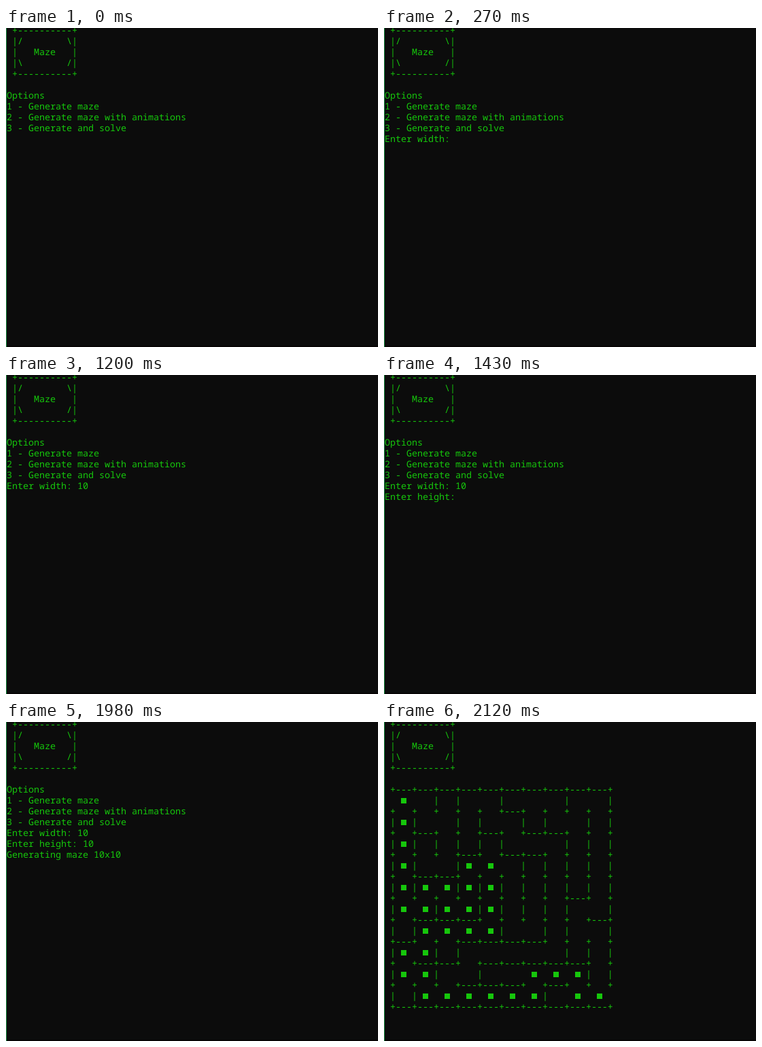
Write an HTML page that moves like this. It is 547x470 px and loops after 2.75 s.

```html
<!DOCTYPE html>
<html lang="en">
<head>
<meta charset="utf-8">
<title>Maze console</title>
<style>
html, body { margin: 0; width: 100%; height: 100%; overflow: hidden; background: #0c0c0c; }
svg { display: block; width: 547px; height: 470px; }
text {
  font: 13.333px "Noto Sans Mono", "DejaVu Sans Mono", monospace;
  white-space: pre;
  text-rendering: geometricPrecision;
}
g, rect.step, text { fill: #16c60c; }
#title, #menu, #maze, .step { animation: 2750ms step-end infinite; }
#title { animation-name: title; }
#menu { animation-name: menu; }
#maze { animation-name: maze; }
@keyframes title { 0% { opacity: 1 } 74.181% { opacity: 0 } 77.09% { opacity: 1 } }
@keyframes menu { 0% { opacity: 1 } 74.181% { opacity: 0 } }
@keyframes maze { 0% { opacity: 0 } 77.09% { opacity: 1 } }
/* each typed piece: hidden until its moment */
@keyframes choice { 0% { opacity: 0 } 6.909% { opacity: 1 } 9.818% { opacity: 0 } }
@keyframes width { 0% { opacity: 0 } 9.818% { opacity: 1 } }
@keyframes width1 { 0% { opacity: 0 } 37.454% { opacity: 1 } }
@keyframes width2 { 0% { opacity: 0 } 43.636% { opacity: 1 } }
@keyframes height { 0% { opacity: 0 } 52% { opacity: 1 } }
@keyframes height1 { 0% { opacity: 0 } 60.363% { opacity: 1 } }
@keyframes height2 { 0% { opacity: 0 } 66.545% { opacity: 1 } }
@keyframes done { 0% { opacity: 0 } 72% { opacity: 1 } }
</style>
</head>
<body>
<svg viewBox="0 0 547 470">
  <rect width="547" height="470" fill="#0c0c0c"/>
  <rect y="468" width="547" height="2" fill="#070505"/>
  <rect width="1" height="470" fill="#1f9447"/>
  <g id="title"></g>
  <g id="menu"></g>
  <g id="maze"></g>
</svg>
<script>
const CELL_W = 8, CELL_H = 16;

function add(parent, tag, attrs) {
  const el = document.createElementNS("http://www.w3.org/2000/svg", tag);
  for (const k in attrs) el.setAttribute(k, attrs[k]);
  return document.getElementById(parent).appendChild(el);
}

// Writes a string at a console column and row; '#' becomes a solid block.
function put(parent, col, row, str) {
  const x = 1 + col * CELL_W, y = 8 + row * CELL_H;
  const el = add(parent, "text", { x, y });
  el.textContent = str.replace(/#/g, " ");
  [...str].forEach((ch, i) => {
    if (ch === "#") add(parent, "rect", { x: x + i * CELL_W, y: y - 8, width: 8, height: 8 });
  });
  return el;
}

function lines(parent, row, block) {
  block.split("\n").slice(1, -1).forEach((s, i) => put(parent, 0, row + i, s));
}

function step(name, col, row, str) {
  const el = put("menu", col, row, str);
  el.classList.add("step");
  el.style.animationName = name;
}

lines("title", 0, String.raw`
 +----------+
 |/        \|
 |   Maze   |
 |\        /|
 +----------+
`);

lines("menu", 6, `
Options
1 - Generate maze
2 - Generate maze with animations
3 - Generate and solve
`);

step("choice", 0, 10, "3");
step("width", 0, 10, "Enter width:");
step("width1", 13, 10, "1");
step("width2", 14, 10, "0");
step("height", 0, 11, "Enter height:");
step("height1", 14, 11, "1");
step("height2", 15, 11, "0");
step("done", 0, 12, "Generating maze 10x10");

lines("maze", 6, `
 +---+---+---+---+---+---+---+---+---+---+
   #     |   |       |           |       |
 +   +   +   +   +   +---+   +   +   +   +
 | # |       |   |       |   |       |   |
 +   +---+   +   +---+   +---+---+   +   +
 | # |   |   |   |   |           |   |   |
 +   +   +   +---+   +---+---+   +   +   +
 | # |       | #   #     |   |   |   |   |
 +   +---+---+   +   +   +   +   +   +   +
 | # | #   # | # | # |   |   |   |   |   |
 +   +   +   +   +   +   +   +   +---+   +
 | #   # | #   # | # |   |   |   |       |
 +   +---+---+---+   +   +   +   +   +---+
 |   | #   #   #   # |       |   |       |
 +---+   +   +---+---+---+---+   +   +   +
 | #   # |   |                   |   |   |
 +   +---+---+   +---+---+---+---+---+   +
 | #   # |       |         #   #   # |   |
 +   +   +   +---+---+---+   +---+   +   +
 |   | #   #   #   #   #   # |     #   #  
 +---+---+---+---+---+---+---+---+---+---+
`);
</script>
</body>
</html>
```
